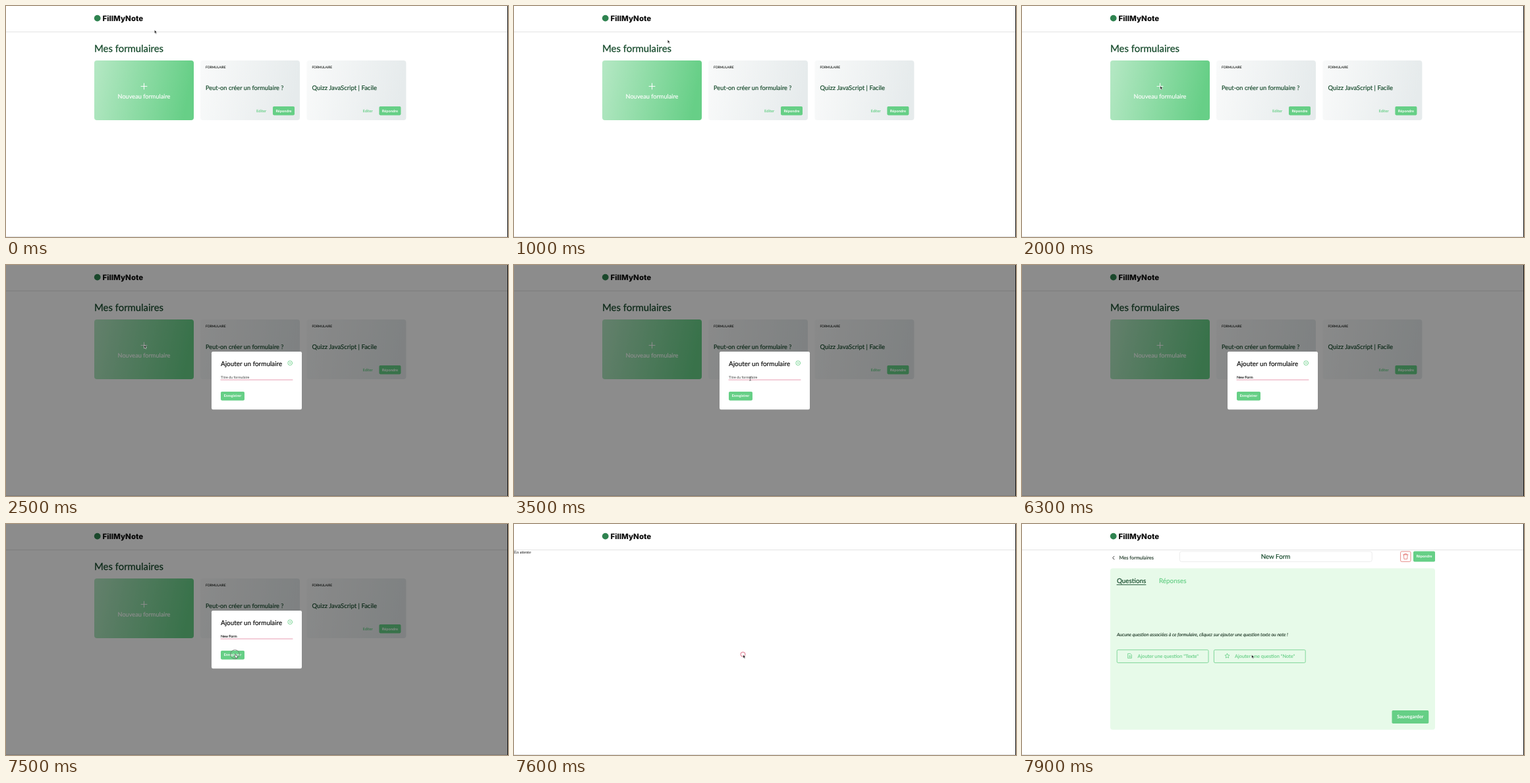
An HTML page for the animation above (8 s loop, 762 by 352 pixels).

```html
<!DOCTYPE html>
<html lang="fr">
<head>
<meta charset="utf-8">
<title>Formulaires</title>
<style>
html, body { margin: 0; width: 100%; height: 100%; overflow: hidden; background: #fff; }
svg { display: block; width: 762px; height: 352px; }
text { font-family: Lato, "Open Sans", sans-serif; text-rendering: geometricPrecision; white-space: pre; }
.mid { text-anchor: middle; }
.brand { font-family: Inter, sans-serif; font-weight: 800; }
.serif { font-family: "Liberation Serif", serif; }
.ital { font-style: italic; }
.bold { font-weight: 700; }
.line { fill: none; stroke-linecap: round; stroke-linejoin: round; }
</style>
</head>
<body>
<svg id="stage" viewBox="0 0 762 352" xmlns="http://www.w3.org/2000/svg">
  <defs>
    <linearGradient id="mint" x1="0" y1="0" x2="1" y2="0.12">
      <stop offset="0" stop-color="#b5e8c4"/><stop offset="1" stop-color="#67cf87"/>
    </linearGradient>
    <linearGradient id="mist" x1="0" y1="0" x2="1" y2="0.12">
      <stop offset="0" stop-color="#f9fafa"/><stop offset="1" stop-color="#e6ebec"/>
    </linearGradient>
  </defs>
  <rect width="762" height="352" fill="#fff"/>
  <g id="header"></g>
  <g id="list"></g>
  <g id="wait"></g>
  <g id="editor"></g>
  <rect id="shade" width="762" height="352" fill="#000" fill-opacity=".45"/>
  <g id="modal"></g>
  <rect x="761" width="1" height="352" fill="#111"/>
  <circle id="ring" fill="none"/>
  <g id="arrow"><path d="M0 0V5.2L1.2 4.1L2.1 6.1L3 5.7L2.1 3.8L3.7 3.7Z" fill="#111" stroke="#fff" stroke-width=".5"/></g>
  <g id="beam"><path class="line" d="M-1.1 -3Q0 -3 0 -2.2V2.2Q0 3 -1.1 3M1.1 -3Q0 -3 0 -2.2M0 2.2Q0 3 1.1 3" stroke="#444" stroke-width=".6"/></g>
  <g id="hand"><path d="M.3 3.2L-.9 1.8Q-.8 1 0 1.6V-1Q.5 -1.7 1 -1V1Q2.9 .8 3.1 1.8V3.4L2.5 5H.9Z" fill="#fff" stroke="#222" stroke-width=".5"/></g>
</svg>
<script>
const LOOP = 8000, STEP = 100;
const GREEN = "#66cf86", DARK = "#14492a", RED = "#e0706a";
const $ = id => document.getElementById(id);

const text = (x, y, size, fill, str, cls = "") => {
  const extra = cls.includes("bold") || cls.includes("brand") || cls.includes("serif")
    ? "" : ` stroke="${fill}" stroke-width="${(size * 0.018).toFixed(3)}"`;
  return `<text x="${x}" y="${y}" font-size="${size}" fill="${fill}" class="${cls}"${extra}>${str}</text>`;
};
const box = (x, y, w, h, r, fill, stroke = "none") =>
  `<rect x="${x}" y="${y}" width="${w}" height="${h}" rx="${r}" fill="${fill}" stroke="${stroke}" stroke-width=".8"/>`;
const line = (d, color, width = 0.8) =>
  `<path class="line" d="${d}" stroke="${color}" stroke-width="${width}"/>`;
const button = (x, y, w, h, size, label) =>
  box(x, y, w, h, 1.8, GREEN) +
  text(x + w / 2, y + h / 2 + size * 0.33, size, "#fff", label, "mid bold");

const card = (x, title, size) =>
  box(x, 83, 151, 91, 4, "url(#mist)") +
  text(x + 8, 94.8, 4.85, "#1b1f1c", "FORMULAIRE") +
  text(x + 8, 127.8, size, DARK, title) +
  text(x + 85, 161.6, 5.85, GREEN, "Editer") +
  button(x + 110, 153, 33, 13.4, 5.6, "Répondre");

const star = (cx, cy, r) => Array.from({ length: 10 }, (_, i) => {
  const a = (i / 5 - 0.5) * Math.PI, q = i % 2 ? r * 0.48 : r;
  return (i ? "L" : "M") + (cx + q * Math.cos(a)).toFixed(2) + " " + (cy + q * Math.sin(a)).toFixed(2);
}).join("") + "Z";

$("header").innerHTML =
  `<circle cx="138.7" cy="18.6" r="4.9" fill="#2f8350"/>` +
  text(146.5, 22.9, 11.5, "#0b0b0b", "FillMyNote", "brand") +
  `<rect y="39" width="762" height="1" fill="#e4e4e4"/><rect y="351" width="762" height="1" fill="#e0e0e0"/>`;

$("list").innerHTML =
  text(134, 70, 14.9, DARK, "Mes formulaires") +
  box(134, 83, 151, 91, 4, "url(#mint)") +
  line("M205 122.4H214M209.5 117.9V126.9", "#fff", 1) +
  text(209.5, 141, 9.2, "#fff", "Nouveau formulaire", "mid") +
  card(295, "Peut-on créer un formulaire ?", 9.26) +
  card(456.4, "Quizz JavaScript | Facile", 9.5);

$("wait").innerHTML = text(0, 45, 6.4, "#111", "En attente", "serif");

$("editor").innerHTML =
  line("M140 49.2L137.6 51.6L140 54", "#222", 0.9) +
  text(147.5, 54, 7.45, "#1c3524", "Mes formulaires") +
  box(239.3, 41.8, 292, 15.6, 3, "#fff", "#e8e8e8") +
  text(385, 53.2, 9.8, DARK, "New Form", "mid") +
  box(574.6, 41.9, 15.4, 15.4, 1.8, "#fff", RED) +
  line("M578.6 46.8H586M580.8 46.8V45.4H583.8V46.8M579.4 46.8L579.9 53.4H584.7L585.2 46.8", RED) +
  button(594, 41.6, 33, 16, 5.6, "Répondre") +
  box(134, 67.5, 493, 246, 4, "#e7fae9") +
  text(144, 90, 9.9, DARK, "Questions") +
  line("M144 92.6H188", DARK, 0.9) +
  text(208, 90, 9.9, GREEN, "Réponses") +
  text(144, 171.2, 7, "#1c3524", "Aucune question associées à ce formulaire, cliquez sur ajouter une question texte ou note !", "ital") +
  box(144.2, 191.8, 138.8, 19.6, 1.6, "none", GREEN) +
  line("M161 197.6H164.6L166.4 199.4V204.4H161ZM162.4 200.8H165M162.4 202.6H165", GREEN) +
  text(175.5, 204.1, 7.35, GREEN, 'Ajouter une question "Texte"') +
  box(291.4, 191.8, 138.8, 19.6, 1.6, "none", GREEN) +
  line(star(311.5, 201.1, 3.7), GREEN) +
  text(323, 204.1, 7.35, GREEN, 'Ajouter une question "Note"') +
  button(561.5, 284, 55.8, 20, 7.3, "Sauvegarder");

$("modal").innerHTML =
  box(312, 132, 137, 88.2, 2.2, "#fff") +
  text(326, 154.2, 9.95, "#0d0d0d", "Ajouter un formulaire") +
  `<circle class="line" cx="431.2" cy="149.4" r="3.4" stroke="${GREEN}" stroke-width=".8"/>` +
  line("M430 148.2L432.4 150.6M432.4 148.2L430 150.6", GREEN, 0.7) +
  `<g id="hint">${text(326, 172.8, 5.3, "#666", "Titre du formulaire")}</g>` +
  `<g id="field">${text(326, 172.8, 5.4, "#111", "")}</g>` +
  `<rect id="caret" y="168.2" width=".7" height="5.6" fill="#111"/>` +
  line("M326 175H435", "#e2859f") +
  button(326, 193, 36, 13.4, 5.45, "Enregistrer");

const field = $("field").firstChild;
const typed = [[4700, "N"], [4900, "Ne"], [5100, "New"], [5200, "New "], [5500, "New F"],
  [5600, "New Fo"], [5700, "New For"], [5800, "New Form"]];

// Pointer stops: time, x, y
const stops = [[0, 225.4, 36.6], [100, 225, 36.8], [300, 225, 36.8], [800, 234, 49], [900, 234, 49],
  [1800, 211, 121], [2000, 209.8, 121.8], [3000, 209.8, 121.8], [3400, 352, 178], [3600, 365, 168.6],
  [6600, 365, 168.6], [7200, 347.8, 199.2], [7600, 347.8, 199.2], [7700, 348.6, 199.2], [LOOP, 348.6, 199.2]];

const ease = u => u * u * (3 - 2 * u);
const between = (t, a, b) => t >= a && t < b;
const show = (id, on) => $(id).setAttribute("display", on ? "inline" : "none");

function pointer(t) {
  const i = stops.findIndex(s => s[0] > t);
  const [t0, x0, y0] = stops[i - 1], [t1, x1, y1] = stops[i];
  const u = ease((t - t0) / (t1 - t0));
  return [x0 + (x1 - x0) * u, y0 + (y1 - y0) * u];
}

// A press starts as a wide grey ring, shrinks to red, then spreads on release
function ringAt(t) {
  if (between(t, 3900, 4000)) return [365, 168.4, 5.8, "#777"];
  if (between(t, 4000, 4200)) return [365, 168.4, 3.5, "#d9607a"];
  if (between(t, 4200, 4300)) return [365, 168.4, 5.6, "#efb6c2"];
  if (between(t, 7500, 7600)) return [347.5, 198.6, 6.8, "#6c7a70"];
  if (between(t, 7600, 7700)) return [347.5, 198.6, 3.5, "#d9607a"];
  if (between(t, 7700, 7800)) return [347.5, 198.6, 5.6, "#efb6c2"];
  return null;
}

function draw(t) {
  const open = between(t, 2500, 7600);
  show("list", t < 7600);
  show("wait", between(t, 7600, 7700));
  show("editor", t >= 7700);
  show("shade", open);
  show("modal", open);

  const value = typed.reduce((v, [at, s]) => t >= at ? s : v, "");
  field.textContent = value;
  show("hint", !value);
  show("caret", between(t, 4200, 6300) || between(t, 6800, 7300));
  $("caret").setAttribute("x", 325.8 + (value && open ? field.getComputedTextLength() : 0));

  const [x, y] = pointer(t);
  const overField = open && between(y, 163, 176) && x > 326;
  const overButton = open && between(y, 193, 207) && x > 326;
  const hidden = between(t, 5500, 6700);
  const kind = hidden ? "" : overField ? "beam" : overButton ? "hand" : "arrow";
  for (const id of ["arrow", "beam", "hand"]) {
    show(id, id === kind);
    $(id).setAttribute("transform", `translate(${x.toFixed(2)} ${y.toFixed(2)})`);
  }

  const ring = ringAt(t);
  show("ring", ring);
  if (ring) {
    ["cx", "cy", "r", "stroke"].forEach((k, i) => $("ring").setAttribute(k, ring[i]));
    $("ring").setAttribute("stroke-width", 0.9);
  }
}

const start = performance.now();
function tick() {
  const t = (performance.now() - start) % LOOP;
  draw(Math.floor(t / STEP) * STEP);
  requestAnimationFrame(tick);
}
draw(0);
requestAnimationFrame(tick);
</script>
</body>
</html>
```
